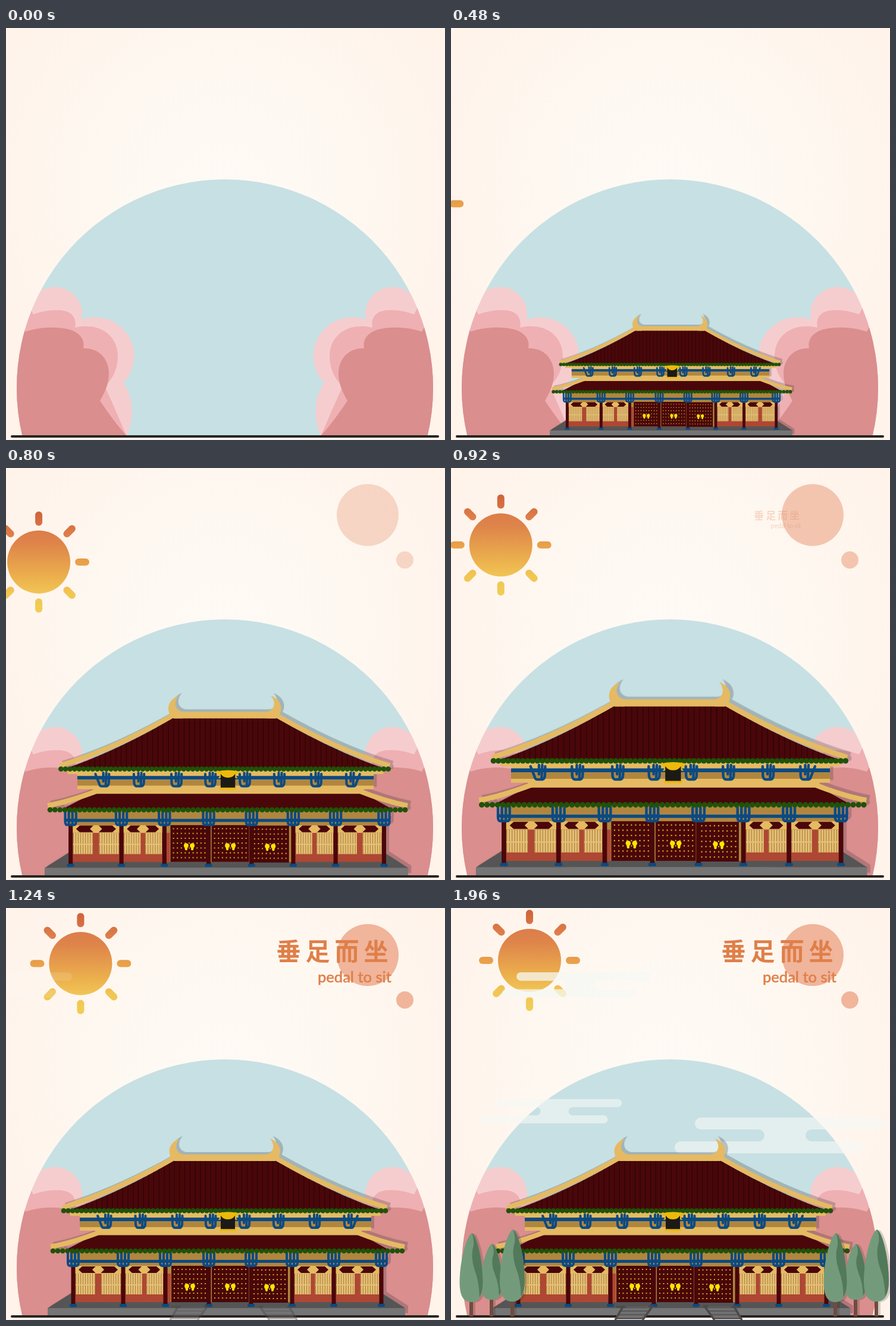
Recreate the animation shown at these times as an HTML page. Size 738 by 692 pixels, loop 2 s.

```html
<!DOCTYPE html>
<html lang="zh">
<head>
<meta charset="utf-8">
<style>
html, body { margin: 0; width: 100%; height: 100%; overflow: hidden; background: #fff4eb; }
svg { display: block; width: 738px; height: 692px; }
#palace { filter: drop-shadow(5px -4px 0 rgba(40, 40, 50, .24)); }
.trees { filter: drop-shadow(4px 1px 0 rgba(50, 40, 40, .2)); }
</style>
</head>
<body>
<svg id="stage" viewBox="0 0 738 692"></svg>
<script>
const GOLD = '#e5ba62', BROWN = '#b0863f', BLUE = '#0b4a82', MAROON = '#49070a', RED = '#ae4733';

const rect = (x, y, w, h, fill, rx = 0) =>
  `<rect x="${x}" y="${y}" width="${w}" height="${h}" fill="${fill}" rx="${rx}"/>`;
const fillPath = (d, fill) => `<path d="${d}" fill="${fill}"/>`;
const line = (d, color, width, extra = '') =>
  `<path d="${d}" fill="none" stroke="${color}" stroke-width="${width}" ${extra}/>`;
const circle = (x, y, r, fill) => `<circle cx="${x}" cy="${y}" r="${r}" fill="${fill}"/>`;
const at = (x, y, body, more = '') => `<g transform="translate(${x} ${y}) ${more}">${body}</g>`;
const each = (list, f) => list.map(f).join('');
const range = (n, f) => each([...Array(n).keys()], f);

// Pink bushes, drawn for the left side and mirrored for the right
const bush =
  fillPath('M0 481H36A46 46 0 1 1 127.6 487V490A65 65 0 0 1 197 596C214 618 216 655 203 684H0Z', '#f6cdce') +
  fillPath('M36 462L46 481Q70 472 92 474C112 476 119 488 116 503C158 494 188 516 188 552C187 575 180 586 171 597L168 606Q186 645 202 684H0V462Z', '#efb0b3') +
  fillPath('M29 503L33 510C55 502 85 501 105 506C124 511 133 523 130 538C160 537 173 560 173 580C173 598 166 612 158 626Q182 662 202 684H0V503Z', '#da8e8e');

const cloud = fillPath(
  'M10 0H308A10 10 0 0 1 308 20H196A10 10 0 0 0 196 40H273A10 10 0 0 1 273 60H-24' +
  'A10 10 0 0 1 -24 40H107A10 10 0 0 0 107 20H10A10 10 0 0 1 10 0Z', '#f6f8f5');

const tree = (x, y, w, h) => {
  const foot = y + h;
  return rect(x - 3, foot - 8, 6, 694 - foot, '#714b40') +
    at(x, y,
      fillPath('M1 0C10 4 20 45 20 80C20 104 12 112 0 112C-12 112 -20 104 -20 80C-20 45 -8 4 1 0Z', '#739b7b') +
      fillPath('M1 0C10 4 20 45 20 80Q20 95 14 104Q14 80 6 60Q-2 38 4 20Q5 8 1 0Z', '#527a5a'),
      `scale(${w / 40} ${h / 112})`);
};
const trees = x => tree(x + 34, 564, 36, 94) + tree(x, 546, 39, 116) + tree(x + 69, 540, 42, 121);

const tiles = (x0, x1, y) => range(73, i => circle(x0 + (x1 - x0) * i / 72, y, 4.3, '#1f5208'));

const upperBracket = (x, lean) => at(x, 526,
  line(`M${lean < 0 ? -14 : -8.5} -9L-8 6Q-7 11 -4 11H4Q7 11 8 6L${lean > 0 ? 14 : 8.5} -9M-1 -11V3M4 -11L3 9`, BLUE, 4, 'stroke-linecap="round"'));
const lowerBracket = x => at(x, 590,
  line('M-9 -10V5Q-9 11 -5 11H5Q9 11 9 5V-10M-3 -11V10M3 -11V10', BLUE, 4, 'stroke-linecap="round"') +
  line('M-9 3H9', BLUE, 5));

const windowPane = (x, w) => rect(x, 614, w, 35, '#e5c075') +
  line(`M${x} 631.5h${w}`, '#ac8040', 35, 'stroke-dasharray="1.1 2.9"') +
  line(`M${x} 633h${w}`, '#e5c075', 2);
const bay = (x0, x1) => {
  const m = (x0 + x1) / 2, r = (x1 - x0) / 2 - 9, w = (x1 - x0) * .39;
  return rect(x0, 601, x1 - x0, 13, GOLD) +
    fillPath(`M${m - r} 607.5l6-5.5H${m + r - 6}l6 5.5l-6 5.5H${m - r + 6}Z`, MAROON) +
    fillPath(`M${m - 10} 607.5l6-6h8l6 6l-6 6h-8Z`, GOLD) +
    windowPane(x0 + 4, w) + windowPane(x1 - 4 - w, w);
};
const door = (x, y) => rect(x, y, 62, 61, MAROON) +
  range(7, i => line(`M${x + 4} ${y + 6 + i * 8}h55`, '#d6a41c', 2, 'stroke-dasharray="2 4.5"')) +
  each([26, 36], d => circle(x + d, y + 34, 3.9, '#ffe400') + rect(x + d - 2, y + 36, 4, 6, '#ffe400', 2));

const horn = fillPath('M283 425C271 416 270 396 292 387C283 397 284 411 298 414V425Z', GOLD);
const roofSlope = line('M95 503Q182 477 282 420', GOLD, 8);
const roofShape = 'M283 424H453Q545 478 632 508H104Q191 478 283 424Z';
const mirror = (body, sum) => body + `<g transform="translate(${sum}) scale(-1 1)">${body}</g>`;
const columns = [113, 197, 268, 341, 412, 481, 551, 631];

const palace =
  fillPath('M70 672L113 645H629L671 672Z', '#555') + rect(70, 672, 601, 12.5, '#757575') +
  rect(113, 594, 518, 68, RED) +
  bay(113, 197) + bay(197, 268) + bay(481, 551) + bay(551, 631) +
  rect(268, 600, 213, 62, BROWN) + rect(268, 614, 9, 48, RED) +
  door(278, 601) + door(346, 601) + door(412, 602) +
  rect(108, 574, 524, 27, BROWN) + rect(108, 591, 524, 5, BLUE) +
  each(columns, x => rect(x - 3.5, 600, 7, 66, MAROON) + rect(x - 6, 665, 12, 5, BLUE, 2) + lowerBracket(x)) +
  fillPath('M149 549H598L645 575H99Z', MAROON) +
  rect(150, 541.5, 448, 8, GOLD) +
  line('M159 544Q112 562 75 569', GOLD, 8) + line('M588 544Q633 562 670 569', GOLD, 8) +
  tiles(79, 666, 576) +
  rect(124, 512, 490, 30, GOLD) + rect(108, 510, 522, 7, GOLD) +
  rect(124, 520, 490, 6, BLUE) + rect(124, 526, 490, 10, BROWN) +
  each([168, 226, 288, 344, 401, 458, 519, 577], x => upperBracket(x, x < 170 ? -1 : x > 570 ? 1 : 0)) +
  fillPath(roofShape, MAROON) +
  `<clipPath id="roof"><path d="${roofShape}"/></clipPath>` +
  `<g clip-path="url(#roof)">${line('M100 466H640', '#2c0406', 90, 'stroke-dasharray="1.2 7.5"')}</g>` +
  mirror(roofSlope + horn, 735.5) + rect(283, 414, 170, 11, GOLD) +
  tiles(97, 638, 508.5) +
  fillPath('M353 513L360 519L357 524Q373 519 389 524L386 519L394 513Q373 508 353 513Z', '#efb90b') +
  rect(361, 517, 24, 24, '#1c1a17') + fillPath('M360 514H386Q383 523 373 523Q363 523 360 514Z', '#efb90b') +
  line('M359 541H387', '#efb90b', 3.5);

const stair = fillPath('M287 669H338L323 691H275Z', '#5c5c5c') +
  line('M285 674H334M281 680H330M278 686H326', '#757575', 3) +
  line('M290 668L276 692M338 670L322 692', '#4a4a4a', 3.5) +
  line('M278 670H294M332 669H341', '#4a4a4a', 3);

const rays = range(8, i => `<rect x="-6" y="-85" width="12" height="24" rx="6" transform="rotate(${i * 45})"/>`);

stage.innerHTML = `
<defs>
  <radialGradient id="paper" gradientUnits="userSpaceOnUse" cx="368" cy="270" r="430">
    <stop stop-color="#fefaf5"/><stop offset=".5" stop-color="#fef8f1"/><stop offset="1" stop-color="#fff3ea"/>
  </radialGradient>
  <linearGradient id="glow" x1="0" y1="0" x2="0" y2="1">
    <stop stop-color="#dc7d4a"/><stop offset=".2" stop-color="#de844a"/><stop offset=".75" stop-color="#ecb14d"/><stop offset="1" stop-color="#f1c556"/>
  </linearGradient>
  <clipPath id="dome"><path d="M27.3 684.5A350 350 0 1 1 708.7 684.5Z"/></clipPath>
  <mask id="rays" maskUnits="userSpaceOnUse" x="-90" y="-90" width="180" height="180"><g fill="#fff">${rays}</g></mask>
  <linearGradient id="rayGlow" x1="0" y1="0" x2="0" y2="1">
    <stop stop-color="#cf6238"/><stop offset=".25" stop-color="#df804c"/><stop offset=".5" stop-color="#e9a04a"/>
    <stop offset=".8" stop-color="#f1c553"/><stop offset="1" stop-color="#f0ce55"/>
  </linearGradient>
</defs>
${rect(0, 0, 738, 692, 'url(#paper)')}
<g clip-path="url(#dome)">${rect(0, 250, 738, 440, '#c7e0e3')}${mirror(bush, 732)}</g>
<g id="cloudL" opacity=".62">${cloud}</g>
<g id="cloudR" opacity=".62">${cloud}</g>
<g id="palace">${palace}</g>
${line('M10 686H726', '#262424', 4, 'stroke-linecap="round"')}
<g id="stairs">${mirror(stair, 765)}</g>
<g id="treesL" class="trees">${trees(34)}</g>
<g id="treesR" class="trees">${trees(646)}</g>
<g id="sun">${circle(0, 0, 53, 'url(#glow)')}<rect x="-85" y="-85" width="170" height="170" fill="url(#rayGlow)" mask="url(#rays)"/></g>
<g id="cloudS">${cloud}</g>
<g id="discs">${circle(608, 79, 52, '#f0b59b')}${circle(670.5, 154.5, 14.5, '#f0b59b')}</g>
<g id="title" fill="#df7f49" text-anchor="middle">
  <text x="475 524 573 622" y="88" font-size="41" font-weight="700" font-family="'Noto Sans CJK SC','Noto Sans CJK',sans-serif">垂足而坐</text>
  <text x="586" y="125" font-size="25.5" font-weight="500" stroke="#df7f49" stroke-width=".4" font-family="Lato,'Open Sans',sans-serif">pedal to sit</text>
</g>`;

const el = id => document.getElementById(id);
const move = (id, transform) => el(id).setAttribute('transform', transform);
const fade = (id, value) => el(id).setAttribute('opacity', value);
const part = (t, from, to) => Math.min(1, Math.max(0, (t - from) / (to - from)));
// Share of the way still left in an ease-out
const left = (t, from, to, power) => (1 - part(t, from, to)) ** power;
const scaleAt = (x, y, s) => `translate(${x} ${y}) scale(${s}) translate(${-x} ${-y})`;

function draw(t) {
  const settle = part(t, 970, 1210);
  const size = 1.11 * (1 - left(t, 30, 970, 1.45)) - .11 * settle * settle * (3 - 2 * settle);
  move('palace', scaleAt(369, 684.5, size));
  fade('palace', part(t, 0, 390));

  move('sun', `translate(${132 - 236 * left(t, 400, 1500, 2.48)} ${88 + 259 * left(t, 400, 1600, 3.23)})`);
  fade('discs', part(t, 560, 1040));
  move('title', scaleAt(547, 85, 1 - left(t, 840, 1160, 1.83)));
  fade('title', part(t, 840, 1160));

  fade('stairs', part(t, 1140, 1360));
  const treeGap = left(t, 1240, 1880, 2);
  move('treesL', `translate(${-140 * treeGap})`);
  move('treesR', `translate(${164 * treeGap})`);

  move('cloudS', `translate(${110 - 264 * left(t, 1200, 1720, 2)} 108) scale(.71)`);
  fade('cloudS', .75 * part(t, 1200, 1440));
  const drift = .4825 * (1960 - t);
  move('cloudL', `translate(${71 - drift} 321) scale(.68)`);
  move('cloudR', `translate(${410 + drift} 352)`);
}

const start = performance.now();
function tick() {
  const t = (performance.now() - start) % 2000;
  draw(Math.floor(t / 40) * 40);
  requestAnimationFrame(tick);
}
tick();
</script>
</body>
</html>
```
